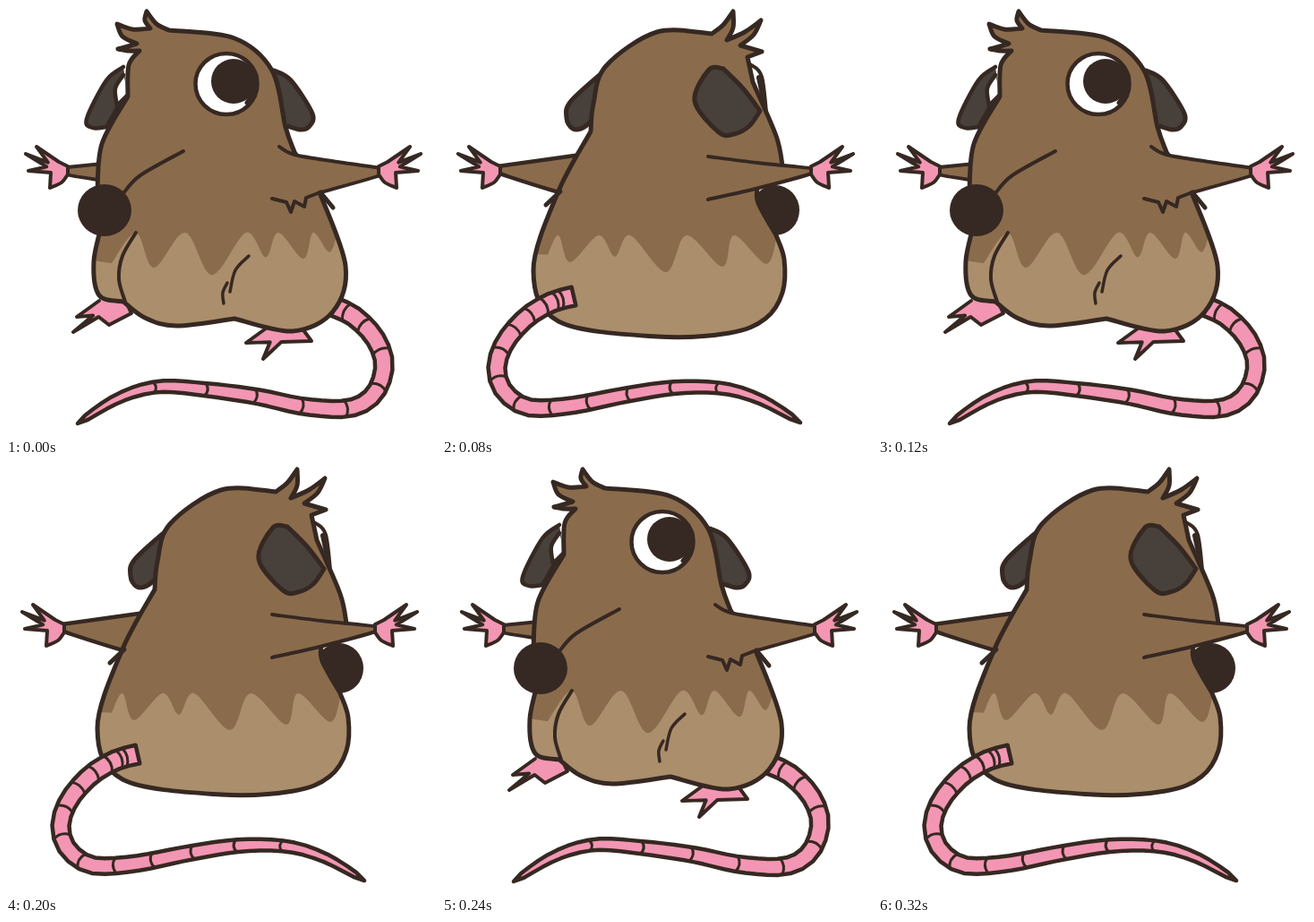
These frames come from a looping animation (480x480 px, 0.36 s). An HTML page with a canvas:

```html
<!DOCTYPE html>
<html lang="en">
<head>
<meta charset="utf-8">
<title>Spinning rat</title>
<style>
  html, body { margin: 0; height: 100%; overflow: hidden; background: #fff; }
  canvas { display: block; width: 100vw; height: 100vh; object-fit: contain; }
</style>
</head>
<body>
<canvas width="480" height="480"></canvas>
<script>
const ctx = document.querySelector('canvas').getContext('2d');
const INK = '#362822', FUR = '#8a6c4c', BELLY = '#ab8e6b', PINK = '#f296b3', EAR = '#48403a', WHITE = '#fff';
const STEP = 40;

const parse = spec => spec.trim().split(/\s+/).map(p => p.split(',').map(Number));
const mix = (a, b, t) => a.map((v, i) => v + (b[i] - v) * t);

// Smooth path data through "x,y" points; a "/" makes the preceding point a corner.
function curve(spec) {
  let data = '', last = null;
  for (const piece of spec.split('/')) {
    const pts = parse(piece);
    if (last) pts.unshift(last); else data = 'M' + pts[0];
    for (let i = 0; i < pts.length - 1; i++) {
      const b = pts[i], c = pts[i + 1], a = pts[i - 1] || b, d = pts[i + 2] || c;
      const out = b.map((v, k) => v + (c[k] - a[k]) / 6);
      const into = c.map((v, k) => v - (d[k] - b[k]) / 6);
      data += `C${out} ${into} ${c}`;
    }
    last = pts[pts.length - 1];
  }
  return data;
}

function paint(path, fill, width = 4.5) {
  if (typeof path === 'string') path = new Path2D(curve(path));
  if (fill) { ctx.fillStyle = fill; ctx.fill(path); }
  if (width) { ctx.lineWidth = width; ctx.stroke(path); }
}
const line = (spec, width = 4) => paint(spec, null, width);

function oval(x, y, rx, ry, fill, width = 0) {
  const path = new Path2D();
  path.ellipse(x, y, rx, ry, 0, 0, 7);
  paint(path, fill, width);
}

// Wavy edge of the belly: dips and crests alternate, wider dips hang lower.
function fringe(xs, crest) {
  return xs.map((x, i) => {
    const gap = (xs[i + 1] ?? x + 20) - (xs[i - 1] ?? x - 20);
    return [x, i % 2 ? crest : 258 + .62 * gap];
  }).join(' ');
}

function torso(outline, waveXs, crest) {
  const body = new Path2D(curve(outline));
  paint(body, FUR, 0);
  ctx.save();
  ctx.clip(body);
  paint(fringe(waveXs, crest) + ' / 480,260 / 480,400 / 0,400 / 0,270', BELLY, 0);
  ctx.restore();
  paint(body, null, 5);
}

// Tapering tube along a centre line, with rings that spread out toward the tip.
function tail(spine, ringCount, spread) {
  const guide = document.createElementNS('http://www.w3.org/2000/svg', 'path');
  guide.setAttribute('d', curve(spine));
  const length = guide.getTotalLength();
  const at = u => guide.getPointAtLength(u * length);
  const edge = (u, side, ahead = 0) => {
    const p = at(u), a = at(u - .01), b = at(u + .01);
    const dx = b.x - a.x, dy = b.y - a.y, size = Math.hypot(dx, dy);
    const half = side * 10.5 * (1 - u) ** .35;
    return [p.x + (ahead * dx - half * dy) / size, p.y + (ahead * dy + half * dx) / size];
  };
  const samples = Array.from({ length: 41 }, (_, i) => i / 40);
  const top = samples.map(u => edge(u, 1));
  const bottom = samples.map(u => edge(u, -1)).reverse();
  const tube = new Path2D(`M${top.join('L')}L${bottom.join('L')}Z`);
  paint(tube, PINK);
  for (let i = 0; i < ringCount; i++) {
    const u = .03 + .77 * (i / (ringCount - 1)) ** spread;
    paint(new Path2D(`M${edge(u, 1)}Q${edge(u, 0, -6)} ${edge(u, -1)}`), null, 3);
  }
}

// Pointed toes around a palm, from one side of the wrist to the other.
function paw(start, toes, end, palm, web = .35) {
  const tips = parse(toes), [centre] = parse(palm);
  const spec = tips.map((tip, i) => {
    const next = tips[i + 1];
    return next ? `${tip} / ${mix(centre, mix(tip, next, .5), web)}` : tip;
  });
  paint(`${start} / ${spec.join(' / ')} / ${end}`, PINK, 4);
}

function hand(x, side = 1) {
  ctx.save();
  ctx.translate(x, 0);
  ctx.scale(side, 1);
  paw('48,179 38,174', '13,157 1,165 4,184 28,203', '41,197 48,188 / 48,179', '36,182');
  ctx.restore();
}

function front() {
  tail('367,336 389,347 412,371 422,401 411,433 383,449 333,447 280,436 221,428 170,425 125,438 80,466', 9, 1.3);
  paw('104,329', '79,347 75,364 115,356', '140,343 / 132,326', '108,340');
  paw('290,360', '268,376 287,394 341,374', '330,359', '304,370');
  paint('131,68 112,83 90,126 97,136 112,135 / 135,95', EAR);
  paint('131,77 122,92 124,111 / 137,98', WHITE);
  paint('299,72 318,83 342,120 338,135 328,138 314,134', EAR, 5);
  paint('108,176 68,180 / 68,188 104,194', FUR, 4);
  hand(21);
  torso('182,27 / 168,20 157,6 / 155,16 161,25 / 141,26 124,20 / 130,34 146,42 / 136,45 125,48 / 137,50 149,50 / 137,66 136,101 / 107,154 102,208 / 108,240 / 98,285 104,323 131,330 / 155,348 190,357 255,349 / 320,363 365,341 379,290 350,208 / 322,163 / 312,135 297,72 255,36 182,27',
    [118, 145, 165, 200, 230, 268, 290, 304, 332, 343, 361, 370], 253);
  line('145,253 130,279 126,305 133,330');
  line('271,279 256,295 250,319', 3.5);
  line('247,309 242,320 243,332', 3.5);
  line('131,209 150,189 198,162');
  paint('305,157 / 322,166 370,174 420,181 / 424,187 348,209 / 335,214 / 333,224 / 322,218 / 318,230 / 313,219 / 297,215', FUR, 4);
  line('351,208 365,225', 5);
  hand(464, -1);
  oval(246, 87, 34.5, 34, WHITE, 4.5);
  oval(254, 84, 25, 25, INK);
  line('279,77 279,93 269,108', 5);
  oval(110, 228, 30, 29, INK);
}

function side() {
  tail('368,317 389,328 410,345 424,373 419,410 400,436 372,455 321,463 274,457 226,451 174,443 132,444 95,455', 10, 1.25);
  paint('188,361 173,370 151,376 / 188,374 / 167,383 / 247,380 / 277,377 / 258,369', PINK);
  torso('182,27 / 168,27 154,18 / 163,32 / 145,30 131,20 / 148,40 / 129,40 / 147,48 / 133,52 / 130,68 118,110 / 77,158 64,210 / 86,224 / 100,207 138,177 / 147,179 143,188 105,231 84,291 111,338 150,353 / 212,361 273,372 357,337 379,294 363,224 345,190 322,140 300,70 250,28 182,27',
    [101, 126, 147, 180, 203, 222, 248, 267, 297, 313, 341, 363], 260);
  line('200,277 168,305 173,351');
  oval(190, 83, 37, 34, WHITE, 5);
  oval(188, 84, 26, 24, INK);
  paint('251,70 278,80 309,119 / 302,129 288,135 271,126 255,98 251,70', EAR, 5);
  paint('207,178 / 194,196 / 206,207 / 214,225 / 231,231 / 248,221 260,202 261,189 256,184', FUR, 5);
  paw('202,189', '219,167 251,178 249,195', '231,196 / 219,202 205,195', '222,188');
  oval(68, 225, 33, 29, INK);
}

function back() {
  paint('155,166 62,179 / 62,186 136,210', FUR);
  hand(17);
  paint('185,69 144,106 139,125 146,137 159,135 175,120', EAR, 5);
  oval(372, 228, 27, 28, INK);
  paint('344,65 357,79 363,130 / 350,105', WHITE, 4);
  torso('166,140 / 169,109 183,67 240,29 301,31 / 314,21 325,6 / 325,24 318,38 / 338,29 356,16 / 348,32 333,44 / 357,51 / 341,57 / 347,85 / 373,145 380,178 / 352,203 / 353,220 373,256 / 382,283 380,320 361,349 321,365 240,369 130,352 102,295 129,209 166,140',
    [118, 130, 143, 175, 193, 210, 250, 273, 313, 326, 362, 374], 256);
  line('116,222 132,207', 5);
  line('354,80 359,103', 6);
  paint('314,70 298,71 282,106 309,141 326,143 343,134 355,117 / 336,92 314,70', EAR, 5);
  paint('297,168 352,175 412,181 / 412,187 350,204 297,216', FUR, 4);
  hand(460, -1);
  tail('147,324 122,331 94,348 70,376 61,405 70,431 97,448 144,446 201,435 260,426 314,427 357,440 400,465', 13, 1.65);
}

const poses = [front, side, back];

function frame() {
  ctx.fillStyle = WHITE;
  ctx.fillRect(0, 0, 480, 480);
  ctx.strokeStyle = INK;
  ctx.lineJoin = ctx.lineCap = 'round';
  poses[Math.floor(performance.now() / STEP) % poses.length]();
  requestAnimationFrame(frame);
}
frame();
</script>
</body>
</html>
```
